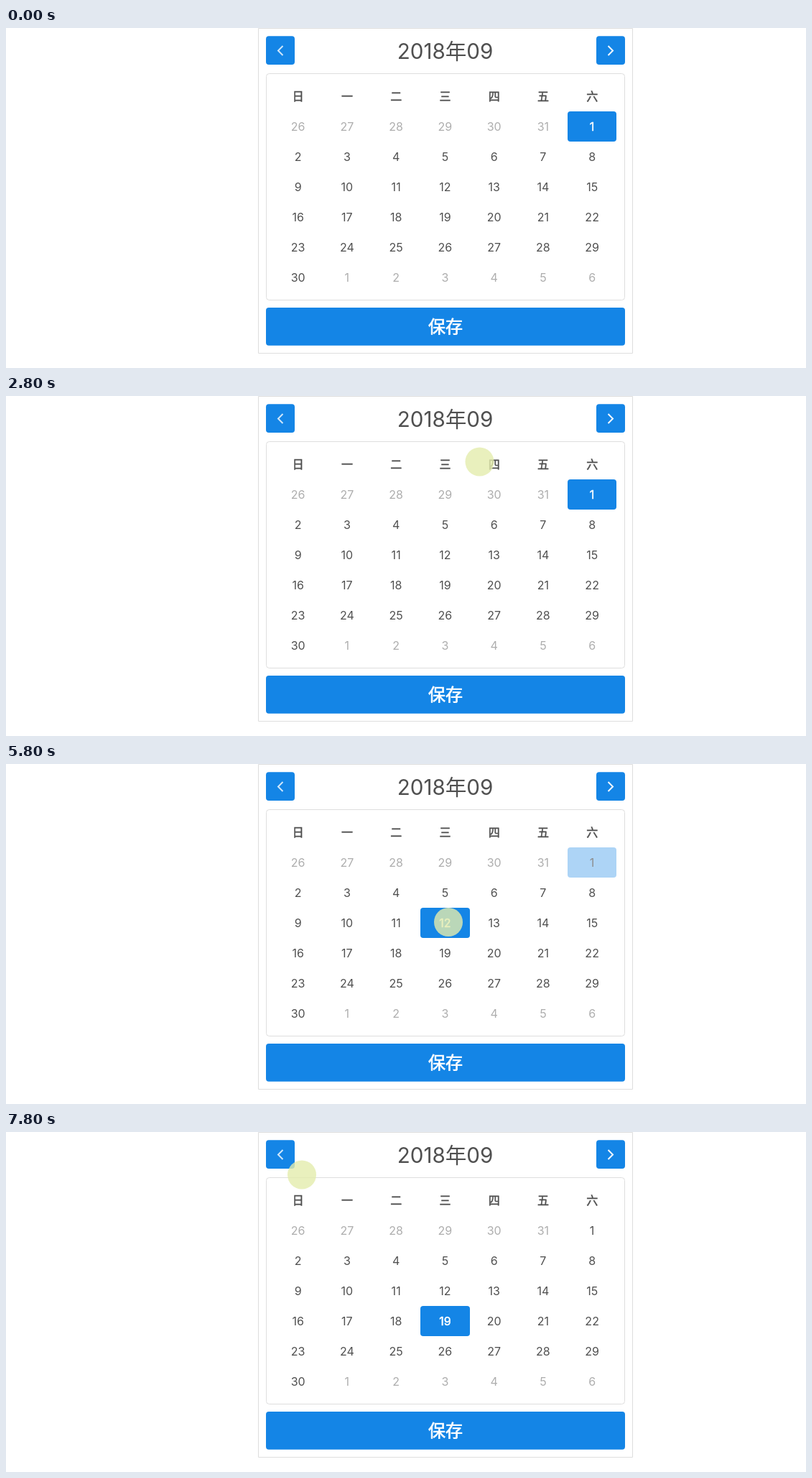
An HTML page with a canvas that plays this animation: 1114 by 473 pixels, repeating every 8 s.

```html
<!DOCTYPE html>
<html lang="zh-CN">
<head>
<meta charset="utf-8">
<style>
  html, body { margin: 0; width: 100%; height: 100%; overflow: hidden; background: #fff; }
  canvas { display: block; }
</style>
</head>
<body>
<canvas id="stage" width="1114" height="473"></canvas>
<script>
const ctx = document.getElementById('stage').getContext('2d');
const LOOP = 8000, STEP = 200, FADE = 300;
const BLUE = [20, 133, 230], INK = [80, 80, 80], PALE = [174, 174, 174];
const WHITE = [255, 255, 255], LINE = [222, 222, 222];
const FONT = 'Inter, "Noto Sans CJK SC", "Noto Sans CJK", sans-serif';
const COL = 68.25, ROW = 42, LEFT = 372.5, TOP = 116;
const FIRST_CELL = 6, DAYS = 30, PREV_DAYS = 31;

// Selected days and when each one is picked.
const picks = [
  { day: 1, at: 0 },
  { day: 12, at: 5690 },
  { day: 19, at: 6850 }
];

// Turning points of the pointer; it eases from one to the next.
const stop = (t, x, y) => ({ t, x, y });
const stops = [
  stop(600, 575, 8), stop(1000, 645, 215), stop(1600, 616, 73),
  stop(2200, 600, 108), stop(2800, 659.5, 91.5), stop(3200, 622, 453),
  stop(3600, 572.5, 191), stop(4400, 608, 219), stop(5000, 608, 219),
  stop(5800, 616, 220), stop(7000, 613, 261), stop(7400, 609, 406),
  stop(7800, 412, 59.5)
];

const rgb = (c, a = 1) => `rgba(${c.join()},${a})`;
const lerp = (a, b, k) => a + (b - a) * k;
const mix = (a, b, k) => a.map((v, i) => Math.round(lerp(v, b[i], k)));
const ease = k => (1 - Math.cos(Math.PI * k)) / 2;

function box(x, y, w, h, r, fill, stroke) {
  ctx.beginPath();
  ctx.roundRect(x, y, w, h, r);
  if (fill) { ctx.fillStyle = fill; ctx.fill(); }
  if (stroke) { ctx.strokeStyle = stroke; ctx.lineWidth = 1; ctx.stroke(); }
}

// A thin outline gives the medium weight that the CJK face lacks.
function text(str, x, y, size, color, outline = 0) {
  ctx.font = `${size}px ${FONT}`;
  ctx.textAlign = 'center';
  ctx.fillStyle = ctx.strokeStyle = rgb(color);
  ctx.fillText(str, x, y);
  if (outline) {
    ctx.lineWidth = outline;
    ctx.strokeText(str, x, y);
  }
}

function arrow(x, dir, alpha) {
  box(x, 11.25, 40, 39.75, 4, rgb(BLUE));
  const cx = x + 20;
  ctx.beginPath();
  ctx.moveTo(cx - 3.5 * dir, 25);
  ctx.lineTo(cx + 3 * dir, 31.5);
  ctx.lineTo(cx - 3.5 * dir, 38);
  ctx.strokeStyle = rgb(WHITE, alpha);
  ctx.lineWidth = 2;
  ctx.stroke();
}

// 1 while the day is selected, easing out once the next one is picked.
function highlight(day, t) {
  const i = picks.findIndex(p => p.day === day);
  if (i < 0 || t < picks[i].at) return 0;
  const next = picks[i + 1];
  if (!next || t < next.at) return 1;
  return Math.max(0, 1 - (t - next.at) / FADE) ** 2.3;
}

function drawDays(t) {
  for (let i = 0; i < 42; i++) {
    const x = LEFT + (i % 7) * COL, y = TOP + Math.floor(i / 7) * ROW;
    const n = i - FIRST_CELL + 1;
    const inMonth = n >= 1 && n <= DAYS;
    const label = n < 1 ? n + PREV_DAYS : inMonth ? n : n - DAYS;
    const k = highlight(n, t);
    if (k) {
      const left = Math.round(x);
      box(left, y, Math.round(x + COL) - left, ROW, 4, rgb(BLUE, k));
    }
    text(label, x + COL / 2, y + 27, 16, mix(inMonth ? INK : PALE, WHITE, k), k === 1 ? 0.5 : 0);
  }
}

function drawPointer(t) {
  if (t < stops[0].t) return;
  const i = Math.max(1, stops.findIndex(s => s.t >= t));
  const a = stops[i - 1], b = stops[i];
  const k = ease((t - a.t) / (b.t - a.t));
  ctx.beginPath();
  ctx.arc(lerp(a.x, b.x, k), lerp(a.y, b.y, k), 20, 0, Math.PI * 2);
  ctx.fillStyle = 'rgba(228,237,173,0.8)';
  ctx.fill();
}

function draw(t) {
  ctx.fillStyle = '#fff';
  ctx.fillRect(0, 0, 1114, 473);
  box(351.5, 0.5, 521, 452, 0, null, rgb(LINE));
  arrow(362, -1, 0.8);
  arrow(822, 1, 0.95);
  text('2018年09', 611.5, 43, 29.6, INK);
  box(362.5, 63.5, 499, 315, 4, null, rgb(LINE));
  [...'日一二三四五六'].forEach((ch, i) => text(ch, LEFT + (i + 0.5) * COL, 101, 16, INK, 0.5));
  drawDays(t);
  box(362, 389, 500, 52.75, 4, rgb(BLUE));
  text('保存', 612, 424, 24, WHITE, 0.7);
  drawPointer(t);
}

const start = performance.now();
function frame() {
  const t = (performance.now() - start) % LOOP;
  draw(Math.floor(t / STEP) * STEP);
  requestAnimationFrame(frame);
}
frame();
</script>
</body>
</html>
```
